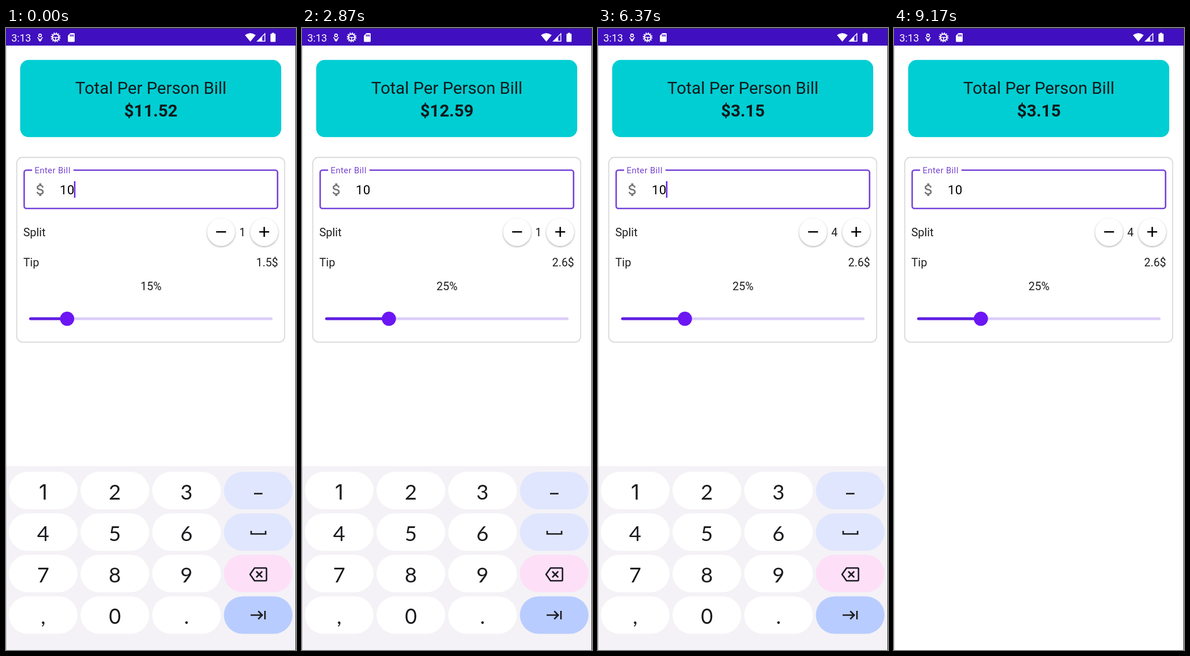
Recreate the animation shown at these times as an HTML page. Size 511x1096 px, loop 9.24 s.

```html
<!DOCTYPE html>
<html lang="en">
<head>
<meta charset="utf-8">
<title>Tip calculator</title>
<style>
  html, body { margin: 0; width: 100%; height: 100%; overflow: hidden; background: #fff; }
  svg { display: block; width: 100%; height: 100%; font-family: Roboto, sans-serif; }
  .body { font-size: 19.9px; fill: #1d1d1d; }
  .head { font-size: 29.75px; fill: #10191a; }
  .mid { text-anchor: middle; }
  .end { text-anchor: end; }
  .key { font: 37px Lato, sans-serif; fill: #1b1b1f; text-anchor: middle; }
  .round { font-family: Inter, sans-serif; }
  .line { fill: none; stroke: #1b1b1f; stroke-width: 2.6; }
</style>
</head>
<body>
<svg viewBox="0 0 511 1096">
  <defs>
    <filter id="soft" x="-30%" y="-30%" width="160%" height="160%">
      <feGaussianBlur stdDeviation="1.5"/>
    </filter>
    <clipPath id="plusClip"><circle cx="455" cy="359.5" r="24.5"/></clipPath>
  </defs>
  <rect width="511" height="1096" fill="#fff"/>

  <!-- status bar -->
  <rect width="511" height="31" fill="#400fbf"/>
  <text x="9.5" y="23.5" font-size="18" fill="#fff">3:13</text>
  <g fill="none" stroke="#fff" stroke-width="1.6">
    <circle cx="60" cy="13" r="2.4"/>
    <path d="M55.5 16.5L60 21.5L64.5 16.5M57.5 20.5L60 23L62.5 20.5"/>
    <circle cx="87.5" cy="16.5" r="5.8" stroke-width="2"/>
    <circle cx="87.5" cy="16.5" r="7.6" stroke-width="2" stroke-dasharray="2 1.98"/>
    <path d="M82 16.5H93M87.5 17V22"/>
  </g>
  <path fill="#fff" d="M113.5 9H119.5Q121 9 121 10.5V23Q121 24.5 119.5 24.5H110.5Q109 24.5 109 23V13.5Z"/>
  <path stroke="#400fbf" stroke-width="1.5" d="M113.5 11.5V15M116 11.5V15M118.5 11.5V15"/>
  <path fill="#fff" d="M421 12.5Q430.5 5.5 440 12.5L430.5 24Z"/>
  <path fill="none" stroke="#fff" stroke-width="1.5" d="M443 23.2L456.2 10V23.2Z"/>
  <path fill="#fff" d="M443 23.5L451.5 15V23.5Z"/>
  <path fill="#fff" d="M468.5 8.5H472.5V10H474Q475 10 475 11V23.5Q475 24.5 474 24.5H467Q466 24.5 466 23.5V11Q466 10 467 10H468.5Z"/>

  <!-- total -->
  <rect x="25" y="56.3" width="460" height="136" rx="15" fill="#00ced3"/>
  <text class="head mid" x="255.3" y="116">Total Per Person Bill</text>
  <text class="head mid" x="255.3" y="156" font-weight="700" id="total"></text>

  <!-- form -->
  <rect x="19" y="228" width="472" height="325.5" rx="10" fill="#fff" stroke="#d0d0d0" stroke-width="1.4"/>
  <rect x="32" y="250.5" width="446.5" height="67.5" rx="4" fill="none" stroke="#7440d8" stroke-width="2.6"/>
  <rect x="46" y="247" width="73" height="7" fill="#fff"/>
  <text x="50.5" y="255.5" font-size="14.9" letter-spacing=".5" fill="#7440d0">Enter Bill</text>
  <path transform="translate(46 270) scale(1.243)" fill="#757575" d="M11.8 10.9c-2.27-.59-3-1.2-3-2.15 0-1.09 1.01-1.85 2.7-1.85 1.78 0 2.44.85 2.5 2.1h2.21c-.07-1.72-1.12-3.3-3.21-3.81V3h-3v2.16c-1.94.42-3.5 1.68-3.5 3.61 0 2.31 1.91 3.46 4.7 4.13 2.5.6 3 1.48 3 2.41 0 .69-.49 1.79-2.7 1.79-2.06 0-2.87-.92-2.98-2.1h-2.2c.12 2.19 1.76 3.42 3.68 3.83V21h3v-2.15c1.95-.37 3.5-1.5 3.5-3.55 0-2.84-2.43-3.81-4.7-4.4z"/>
  <text x="94.7" y="293" font-size="22.4" letter-spacing=".5" fill="#000">10</text>
  <rect id="caret" x="119.8" y="270" width="2.5" height="29" fill="#6a1fe0"/>

  <text class="body" x="30.5" y="366.5">Split</text>
  <g id="buttons"></g>
  <g clip-path="url(#plusClip)"><circle id="ripple" cx="455" cy="359.5" fill="#e2d2fd"/></g>
  <path stroke="#000" stroke-width="2.6" d="M370.3 359.3H387.7M446.3 359.3H463.7M455 350.6V368"/>
  <text class="body mid" x="416.5" y="366.5" id="split"></text>
  <text class="body" x="30.5" y="420">Tip</text>
  <text class="body end" x="479.5" y="420" id="tip"></text>
  <text class="body mid" x="255.5" y="462" id="percent"></text>

  <!-- slider -->
  <g stroke-width="5" stroke-linecap="round">
    <path stroke="#dccff9" d="M43.3 512.2H467.3"/>
    <line id="active" x1="43.3" y1="512.2" y2="512.2" stroke="#611fe2"/>
  </g>
  <circle id="halo" cy="512.5" r="30" fill="#000"/>
  <circle id="thumb" cy="512.3" r="12.5" fill="#6c16f4"/>

  <!-- keyboard -->
  <g id="keyboard">
    <rect y="772" width="511" height="324" fill="#f4f2f6"/>
    <g id="keys"></g>
    <path class="line" d="M437 820.5H452"/>
    <path class="line" d="M432 886V891.5H457.5V886"/>
    <path class="line" stroke-linejoin="round" d="M438 951.5H457.5Q459 951.5 459 953V972.5Q459 974 457.5 974H438L430 962.7ZM441 957.5L451.5 968M451.5 957.5L441 968"/>
    <path class="line" d="M431 1034.5H451M444.5 1027.5L451.5 1034.5L444.5 1041.5M456.3 1027V1042"/>
  </g>

  <circle id="touch" r="13.5" fill="#fff" fill-opacity=".5" stroke="#8a8a9a" stroke-opacity=".4" stroke-width="1.5"/>
  <path fill="#333" d="M0 0H511V1096H510V1H0Z"/>
  <rect y="31" width=".5" height="1065" fill="#999"/>
</svg>
<script>
const LOOP = 9240, STEP = 70;
const BILL = 10;
const DRAG = { down: 910, up: 1890 };
const TAPS = [3290, 4410, 5460];
const HOLD = 140;
const DONE = { down: 7700, up: 7910 };
const THUMB = [[1050, 107.7], [1400, 146.3], [1470, 148], [1610, 153.1]];
const SLIDE = [7910, 8260];

const $ = id => document.getElementById(id);
const clamp = x => Math.max(0, Math.min(1, x));
const ramp = (t, a, b) => clamp((t - a) / (b - a));
const within = (t, span) => t >= span.down && t < span.up;

function set(id, attrs) {
  for (const k in attrs) $(id).setAttribute(k, attrs[k]);
}

function along(track, t) {
  let x = track[0][1];
  for (let i = 1; i < track.length; i++) {
    const [a, from] = track[i - 1], [b, to] = track[i];
    x += (to - from) * ramp(t, a, b);
  }
  return x;
}

function build() {
  $('buttons').innerHTML = [379, 455].map(x =>
    `<circle cx="${x}" cy="361" r="25" fill="#000" opacity=".26" filter="url(#soft)"/>
     <circle cx="${x}" cy="359.5" r="24.5" fill="#fff"/>`).join('');

  const side = ['#e0e6fd', '#e0e6fd', '#fddff8', '#b9ccff'];
  const rows = ['123', '456', '789', ',0.'];
  $('keys').innerHTML = rows.map((row, r) => {
    const y = 782 + r * 73.15;
    return [...row, ''].map((ch, c) => {
      const x = 5 + c * 126.3;
      const cls = '01'.includes(ch) ? 'key round' : 'key';
      return `<rect x="${x}" y="${y}" width="121" height="66" rx="33" fill="${ch ? '#fff' : side[r]}"/>
        <text class="${cls}" x="${x + 60.5}" y="${y + 48.5}">${ch}</text>`;
    }).join('');
  }).join('');
}

// the caret is lit when the loop opens, then blinks once a second
function caretOn(t) {
  return t < 140 || (t + 750) % 1000 < 500;
}

function touchAt(t, thumbX) {
  if (within(t, DRAG)) return [thumbX + 9.8 * ramp(t, DRAG.down, THUMB[0][0]), 514];
  if (TAPS.some(p => t >= p && t < p + HOLD)) return [455, 361];
  if (within(t, DONE)) return [435.5, 1039];
  return null;
}

function draw(time) {
  const t = Math.floor((time % LOOP) / STEP) * STEP;

  // the labels trail the thumb by one step
  const x = along(THUMB, t);
  const value = (along(THUMB, t - STEP) - 43.3) / 424;
  const people = 1 + TAPS.filter(p => t >= p + HOLD).length;
  $('total').textContent = '$' + (BILL * (1 + value) / people).toFixed(2);
  $('tip').textContent = (BILL * value).toFixed(1) + '$';
  $('percent').textContent = Math.floor(value * 100) + '%';
  $('split').textContent = people;

  set('thumb', { cx: x });
  set('active', { x2: x });
  set('halo', {
    cx: x,
    r: 12 + 18 * ramp(t, DRAG.down, DRAG.down + 210),
    opacity: 0.08 * ramp(t, DRAG.down - STEP, DRAG.down) * (1 - ramp(t, DRAG.up, DRAG.up + 150))
  });
  set('caret', { opacity: caretOn(t) ? 1 : 0 });

  const tap = TAPS.find(p => t >= p && t < p + 420);
  const age = tap === undefined ? 420 : t - tap;
  set('ripple', {
    r: 9 + 16 * ramp(age, 0, 210),
    opacity: ramp(age, -40, 70) * (1 - ramp(age, 290, 420))
  });

  const k = ramp(t, ...SLIDE);
  set('keyboard', { transform: `translate(0 ${325 * k * k})` });

  const p = touchAt(t, x);
  set('touch', p ? { cx: p[0], cy: p[1], opacity: 1 } : { opacity: 0 });
}

build();
const start = performance.now();
function tick() {
  draw(performance.now() - start);
  requestAnimationFrame(tick);
}
tick();
</script>
</body>
</html>
```
